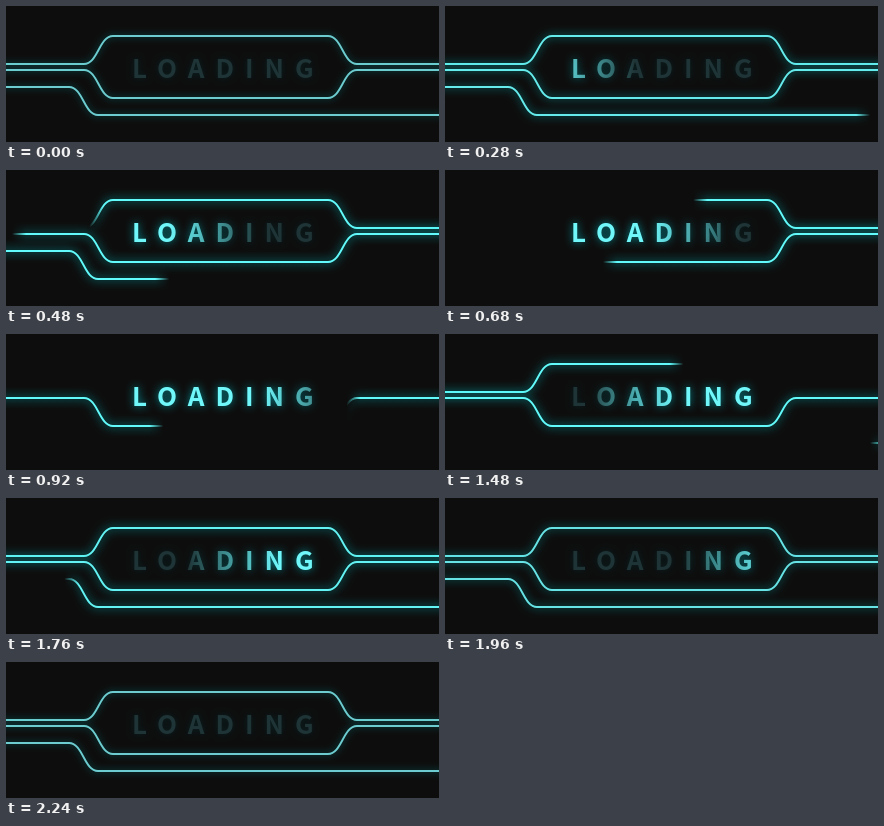
Animation of 433 by 136 pixels, one loop 2400 ms. Source, as an HTML page with a canvas:

```html
<!DOCTYPE html>
<html lang="en">
<head>
<meta charset="utf-8">
<title>Loading</title>
<style>
  html, body { margin: 0; width: 433px; height: 136px; overflow: hidden; background: #0d0d0d; }
  canvas { display: block; }
</style>
</head>
<body>
<canvas id="stage" width="433" height="136"></canvas>
<script>
const W = 433, H = 136, LOOP = 2400, STEP = 40;
const FEATHER = 14, OUT = 20;
const ctx = document.getElementById('stage').getContext('2d');

const upper = new Path2D('M-20 58H78C92 58 93 30 107 30H322C336 30 337 58 351 58H453');
const lower = new Path2D('M-20 64H78C92 64 93 92 107 92H322C336 92 337 64 351 64H453');
const branch = new Path2D('M-20 81H63C77 81 78 109 92 109H453');

// Piecewise linear value from [time, value] pairs
function track(keys, t) {
  if (t <= keys[0][0]) return keys[0][1];
  for (let i = 1; i < keys.length; i++) {
    const [t0, v0] = keys[i - 1], [t1, v1] = keys[i];
    if (t <= t1) return v0 + (v1 - v0) * (t - t0) / (t1 - t0);
  }
  return keys[keys.length - 1][1];
}

const sweep = (start, speed, t) => (t - start) * speed;
const mix = (a, b, k) => a.map((v, i) => Math.round(v + (b[i] - v) * k)).join();

const energyKeys = [[40, 0], [400, 1], [1680, 1], [2240, 0]];
const litKeys = [[80, 80], [480, 208], [920, 300], [1160, 356]];
const fadeKeys = [[1100, 80], [1280, 148], [1480, 185], [1760, 228], [2240, 356]];

// Strokes the part of a path between x = from and x = to, with soft tips
function strokeSpan(path, from, to, energy) {
  from = Math.max(from, -OUT);
  to = Math.min(to, W + OUT);
  if (to - from < 1) return;
  const soft = Math.min(FEATHER / (to - from), 0.5);
  const rgb = mix([108, 204, 207], [98, 250, 250], energy);
  const paint = ctx.createLinearGradient(from, 0, to, 0);
  paint.addColorStop(0, `rgba(${rgb},0)`);
  paint.addColorStop(soft, `rgb(${rgb})`);
  paint.addColorStop(1 - soft, `rgb(${rgb})`);
  paint.addColorStop(1, `rgba(${rgb},0)`);
  ctx.strokeStyle = paint;
  ctx.lineWidth = 1.9;
  ctx.shadowColor = `rgba(0,225,230,${0.4 + 0.5 * energy})`;
  ctx.shadowBlur = 7 + 3 * energy;
  ctx.stroke(path);
}

function drawText(t) {
  ctx.font = 'bold 26px "Noto Sans CJK JP", "Noto Sans CJK SC", "Noto Sans CJK", "Noto Sans", sans-serif';
  ctx.letterSpacing = '11px';
  ctx.textBaseline = 'alphabetic';
  const write = () => ctx.fillText('LOADING', 126, 72);

  ctx.shadowColor = 'rgba(0,70,75,0.35)';
  ctx.shadowBlur = 6;
  ctx.fillStyle = '#1f3436';
  write();

  const lit = track(litKeys, t), faded = track(fadeKeys, t), half = 46;
  const paint = ctx.createLinearGradient(0, 0, W, 0);
  const stop = (x, a) => paint.addColorStop(Math.min(1, Math.max(0, x / W)), `rgba(112,247,250,${a})`);
  if (t < 1120) {
    stop(lit - half, 1);
    stop(lit + half, 0);
  } else {
    stop(faded - half, 0);
    stop(faded + half, 1);
  }
  ctx.fillStyle = paint;
  ctx.shadowColor = 'rgba(0,215,225,0.6)';
  ctx.shadowBlur = 9;
  write();
}

function draw(t) {
  ctx.shadowBlur = 0;
  ctx.fillStyle = '#0d0d0d';
  ctx.fillRect(0, 0, W, H);
  const energy = track(energyKeys, t);
  const span = (path, from, to) => strokeSpan(path, from, to, energy);

  // Every line first empties, then fills again
  span(upper, t < 380 ? -OUT : sweep(379, 0.825, t), W + OUT);
  if (t > 1190) span(upper, -OUT, sweep(1191, 0.825, t));

  span(lower, t < 472 ? -OUT : sweep(472, 0.76, t), W + OUT);
  if (t > 713) span(lower, -OUT, sweep(713, 0.76, t));

  span(branch, -OUT, t < 274 ? W + OUT : W - sweep(274, 1.31, t));
  if (t > 1474) span(branch, W - sweep(1474, 1.31, t), W + OUT);

  drawText(t);
}

const begin = performance.now();
function tick() {
  const t = (performance.now() - begin) % LOOP;
  draw(Math.min(2240, Math.floor(t / STEP) * STEP));
  requestAnimationFrame(tick);
}
tick();
</script>
</body>
</html>
```
